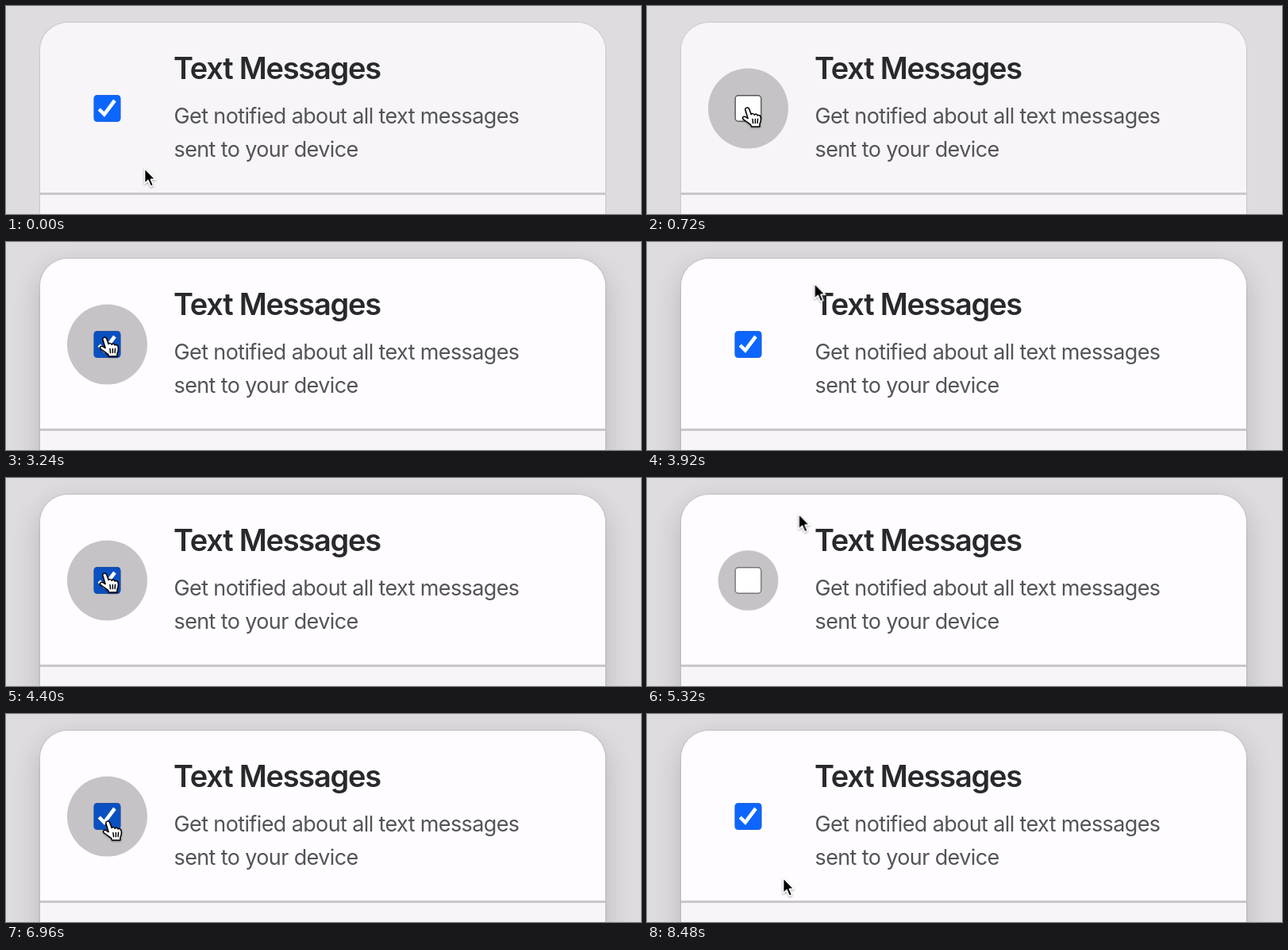
Recreate the animation shown at these times as an HTML page. Size 800 px wide and 262 px high, loop 8760 ms.

```html
<!DOCTYPE html>
<html lang="en">
<head>
<meta charset="utf-8">
<title>Notification setting</title>
<style>
  html, body { margin: 0; width: 100%; height: 100%; overflow: hidden; background: #dedcdf; }
  body { position: relative; font-family: Inter, "Liberation Sans", sans-serif; }
  .card, .shadow { position: absolute; left: 43px; top: 21px; width: 712px; height: 360px; border-radius: 35px; }
  .card { overflow: hidden; background: #f7f5f8; box-shadow: 0 0 2px rgba(0, 0, 0, .3); }
  .shadow { box-shadow: 0 12px 36px rgba(0, 0, 0, .18); }
  .panel { height: 214px; border-bottom: 3px solid #c9c7cb; }
  h1, p { position: absolute; left: 211.5px; margin: 0; white-space: nowrap; }
  h1 { top: 53px; left: 211px; font-size: 38px; line-height: 50px; font-weight: 580; letter-spacing: -.033em; color: #29282b; }
  p { top: 118px; font-size: 27px; line-height: 42px; font-weight: 440; letter-spacing: -.023em; color: #545357; }
  svg { position: absolute; left: 0; top: 0; }
  #halo { transform-origin: 127.5px 129px; }
  #pointer { filter: drop-shadow(0 1.5px 1.2px rgba(0, 0, 0, .35)); }
</style>
</head>
<body>
<div class="shadow" id="shadow"></div>
<div class="card"><div class="panel" id="panel"></div></div>
<h1>Text Messages</h1>
<p>Get notified about all text messages<br>sent to your device</p>
<svg width="800" height="262" viewBox="0 0 800 262">
  <circle id="halo" cx="127.5" cy="129" r="50.5" fill="#c5c3c6"/>
  <rect id="empty" x="111.2" y="112.7" width="32.6" height="32.6" rx="4" fill="#fff" stroke="#767676" stroke-width="1.4"/>
  <g id="checked">
    <rect id="fill" x="110.7" y="112.2" width="33.6" height="33.6" rx="4"/>
    <path d="M117.3 130L123.8 136.6L137 119" fill="none" stroke="#fff" stroke-width="4.6"/>
  </g>
  <g id="pointer" stroke-linejoin="round">
    <path id="arrow" d="M.6 1.5V20.8L5 16.6L8.3 24.2L11.7 22.7L8.5 15.4H14.3Z" fill="#000" stroke="#fff" stroke-width="1.6"/>
    <g id="hand" stroke="#000" stroke-width="1.5" stroke-linecap="round">
      <path fill="#fff" d="M-2 3C-2.8 0 1.4-1.2 2.6 1.6L5.2 8.6C6.2 7 8.6 7.4 9.2 9.2C10.4 7.6 12.8 8.2 13.2 10C14.8 8.8 17 9.8 17.2 12C17.8 15.4 17.4 18 16 20.4V24H5.6L4.6 21.4C1.8 19.4-1 17-4.6 14.8C-6.6 13-4.6 10.4-2 11.6L1.2 13.6Z"/>
      <path fill="none" d="M7 14.6L7.6 19.6M10.4 14.4V19.4M13.6 14.2L13.2 19.4"/>
    </g>
  </g>
</svg>
<script>
const LOOP = 8760, APPROACH = 320, RETREAT = 180, GROW = 200;
const start = [174, 203];

// Each visit: the pointer reaches the box, clicks it and moves away.
const visits = [
  { arrive: 440, click: 700, leave: 1220, spot: [126, 128], away: [169, 194] },
  { arrive: 2200, click: 2760, leave: 3300, spot: [124, 120], away: [215, 47] },
  { arrive: 4190, click: 4680, leave: 5160, spot: [124, 120], away: [192, 42] },
  { arrive: 6040, click: 6560, leave: 7760, spot: [128, 135], away: [171, 205] }
];
const enter = v => v.arrive - 150;
const exit = v => v.leave + 125;

// rows: [ms, value, easing towards the next row]
function track(id, prop, rows, easing = 'linear') {
  const list = [[0, rows[0][1]], ...rows, [LOOP, rows[rows.length - 1][1]]];
  const frames = list.map(([t, value, ease = easing]) => ({ offset: t / LOOP, [prop]: value, easing: ease }));
  document.getElementById(id).animate(frames, { duration: LOOP, iterations: Infinity });
}

const onHover = (id, prop, on, off) =>
  track(id, prop, [[0, off], ...visits.flatMap(v => [[enter(v), on], [exit(v), off]])], 'step-end');
const move = ([x, y]) => `translate(${x}px, ${y}px)`;
const grown = 'scale(1)', shrunk = 'scale(0)';

track('pointer', 'transform', visits.flatMap((v, i) => [
  [v.arrive - APPROACH, move(i ? visits[i - 1].away : start)],
  [v.arrive, move(v.spot)],
  [v.leave, move(v.spot)],
  [v.leave + RETREAT, move(v.away)]
]), 'ease-in-out');
track('halo', 'transform', visits.flatMap(v => [
  [enter(v), shrunk, 'ease'], [enter(v) + GROW, grown],
  [exit(v), grown, 'ease'], [exit(v) + GROW, shrunk]
]));
track('checked', 'opacity', [[0, 1], ...visits.map((v, i) => [v.click, i % 2])], 'step-end');

onHover('hand', 'opacity', 1, 0);
onHover('arrow', 'opacity', 0, 1);
onHover('fill', 'fill', '#0b50c0', '#0c66fd');
onHover('empty', 'stroke', '#555', '#767676');

// The card gains focus after the first click.
track('shadow', 'opacity', [[860, 0], [920, 1]]);
track('panel', 'backgroundColor', [[860, '#f7f5f8'], [920, '#fefcfe']]);
</script>
</body>
</html>
```
